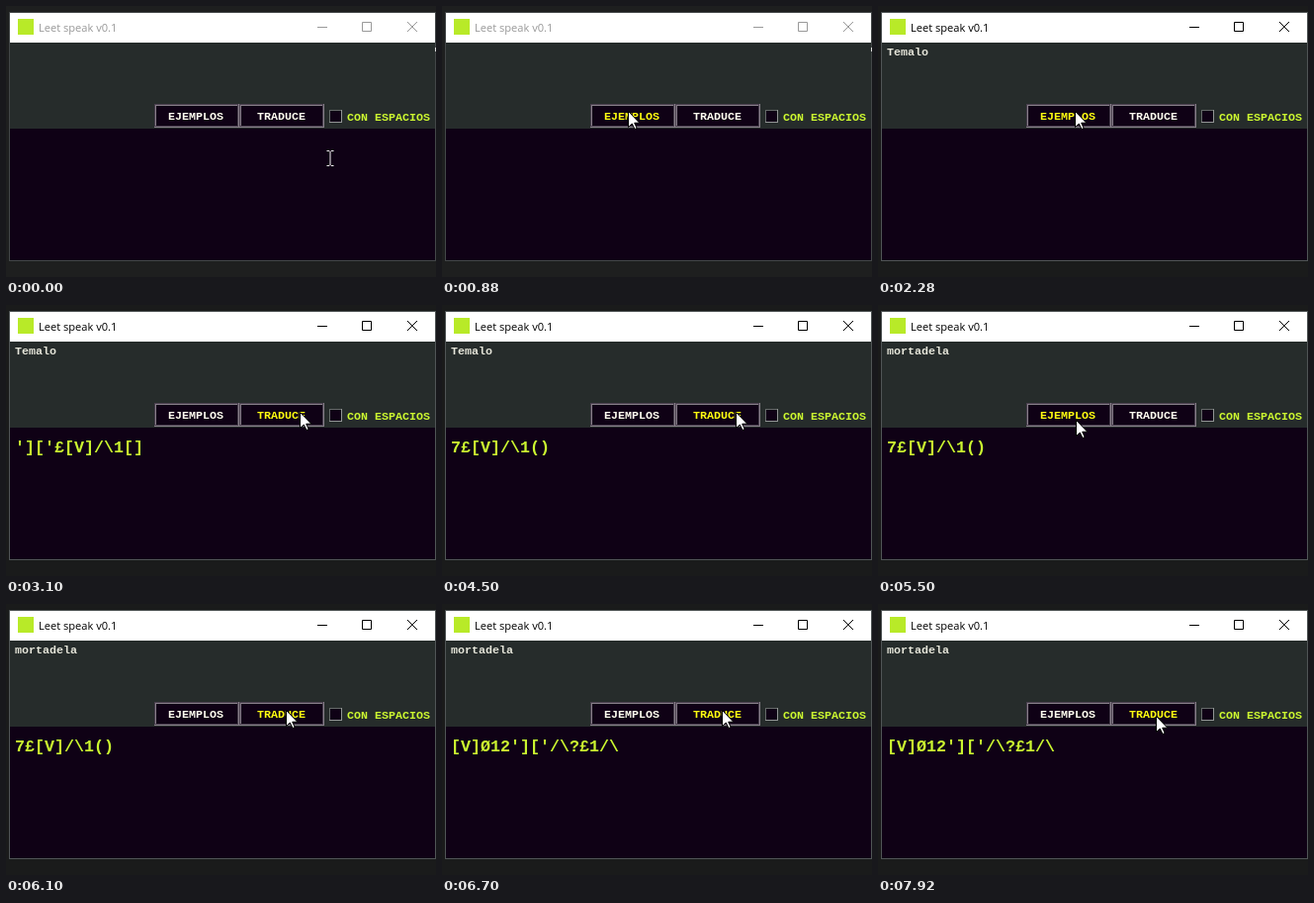
Recreate the animation shown at these times as an HTML page. Size 435 by 274 pixels, loop 8000 ms.

```html
<!DOCTYPE html>
<html lang="es">
<head>
<meta charset="utf-8">
<title>Leet speak</title>
<style>
html, body { margin: 0; width: 100%; height: 100%; overflow: hidden; background: #1e1f1f; }
svg { display: block; width: 435px; height: 274px; }
rect, .crisp { shape-rendering: crispEdges; }
text { font: bold 11.66px "Liberation Mono", "DejaVu Sans Mono", monospace; white-space: pre; }
#title { font: 11.1px "Open Sans", "Noto Sans", sans-serif; }
.lime { fill: #ccf830; }
#output { font-size: 16.667px; }
</style>
</head>
<body>
<svg viewBox="0 0 435 274">
  <rect id="back" width="435" height="274"/>
  <rect x="4" y="7" width="430" height="30" fill="#fff"/>
  <rect x="4" y="37" width="430" height="87" fill="#262c2b"/>
  <rect x="4" y="124" width="430" height="133" fill="#0f0115"/>
  <rect id="border" x="3.5" y="6.5" width="431" height="251" fill="none"/>
  <rect id="speck" x="434" y="42" width="1" height="4" fill="#ddd"/>

  <rect x="12" y="13" width="16" height="16" fill="#b8ea28"/>
  <text id="title" x="33" y="26">Leet speak v0.1</text>
  <path id="controls" d="M315 21.5H325M360.5 16.5H369.5V25.5H360.5ZM406 16L416 26M416 16L406 26" fill="none"/>

  <text id="input" x="9" y="50" fill="#e6e6da"></text>
  <g id="widgets"></g>
  <text class="lime" x="345" y="116">CON ESPACIOS</text>
  <text id="output" class="lime" x="9" y="149"></text>

  <path id="beam" d="M-3.5 -7.5H-1L0 -6.5L1 -7.5H3.5M0 -6.5V6.5M-3.5 7.5H-1L0 6.5L1 7.5H3.5" fill="none" stroke="#f4f4f4"/>
  <path id="arrow" d="M.5 .5V16.5L4.3 13L7 18.5L9.2 17.5L6.7 12.2H11.8Z" fill="#fff" stroke="#000"/>
</svg>
<script>
const LOOP = 8000, STEP = 200, OFFSET = 80;
const LIGHT = "#877f89", DARK = "#4a404f";
const $ = id => document.getElementById(id);
const set = (el, attrs) => { for (const k in attrs) el.setAttribute(k, attrs[k]); };

const words = ["Temalo", "mortadela"];
const leet = {
  a: ["/\\"], d: ["?"], e: ["£"], l: ["1"], m: ["[V]"],
  o: ["[]", "()", "Ø"], r: ["12"], t: ["']['", "7"]
};
const buttons = [
  { label: "EJEMPLOS", x: 150, textX: 164 },
  { label: "TRADUCE", x: 236, textX: 254 }
];

// Pointer glides in steps of 200 ms: first step, last step, end point.
const home = { x: 328, y: 154 };
const glides = [
  [0, 1, 306, 142], [1, 2, 236, 118], [2, 4, 188, 106], [10, 11, 199, 106], [11, 12, 345, 104],
  [12, 14, 297, 108], [23, 25, 200, 116], [28, 30, 283, 107], [38, 39, 281, 113]
];
// Clicks: step of release, steps held down before it.
const clicks = [[6, 0], [15, 0], [22, 0], [27, 1], [33, 1]];

function pointer(n) {
  let { x, y } = home;
  for (const [from, to, endX, endY] of glides) {
    const u = Math.min(1, Math.max(0, (n - from) / (to - from)));
    const k = 1 - (1 - u) ** 2;
    x += (endX - x) * k;
    y += (endY - y) * k;
  }
  return { x, y };
}

function hovered(n) {
  const { x, y } = pointer(n);
  return buttons.findIndex(b => x >= b.x && x < b.x + 86 && y >= 99 && y < 123);
}

const translate = (word, round) =>
  [...word.toLowerCase()].map(c => leet[c][round % leet[c].length]).join("");

function texts(n) {
  let input = "", output = "", examples = 0, rounds = 0;
  for (const [release] of clicks) {
    if (n < release) break;
    if (hovered(release) === 0) input = words[examples++];
    else output = translate(input, rounds++);
  }
  return { input, output };
}

const bevel = (x, y, w, h, topLeft, bottomRight) => `
  <path class="crisp" fill="none" stroke="${topLeft}" d="M${x + .5} ${y + h}V${y + .5}H${x + w}"/>
  <path class="crisp" fill="none" stroke="${bottomRight}" d="M${x} ${y + h - .5}H${x + w - .5}V${y}"/>`;

function button({ label, x, textX }, hover, pressed) {
  const inner = pressed ? [DARK, LIGHT] : [LIGHT, DARK];
  return `<rect x="${x}" y="99" width="86" height="24" fill="#0f0115"/>
    ${bevel(x, 99, 86, 24, DARK, LIGHT)}${bevel(x + 1, 100, 84, 22, ...inner)}
    <text x="${textX}" y="115" fill="${hover ? "#ffff10" : "#fffff0"}">${label}</text>`;
}

const checkbox = `<rect x="327" y="105" width="13" height="13" fill="#0f0115"/>
  ${bevel(327, 105, 13, 13, "#656a69", "#929595")}`;

function draw(t) {
  const n = Math.max(0, Math.floor((t - OFFSET) / STEP));
  const active = n >= clicks[0][0];
  const ink = active ? "#000" : "#999";
  set($("back"), { fill: active ? "#1a1b1b" : "#1e1f1f" });
  set($("border"), { stroke: active ? "#505556" : "#434748" });
  set($("title"), { fill: ink });
  set($("controls"), { stroke: ink });
  set($("speck"), { opacity: active ? 0 : 1 });

  const hover = hovered(n);
  const down = clicks.some(([release, held]) => n < release && n >= release - held);
  $("widgets").innerHTML =
    buttons.map((b, i) => button(b, i === hover, down && i === hover)).join("") + checkbox;

  const { input, output } = texts(n);
  $("input").textContent = input;
  $("output").textContent = output;

  const { x, y } = pointer(n);
  const typing = n < 2;
  const transform = `translate(${Math.round(x)} ${Math.round(y)})`;
  set($("beam"), { transform, opacity: typing ? 1 : 0 });
  set($("arrow"), { transform, opacity: typing ? 0 : 1 });
}

const start = performance.now();
function tick() {
  draw((performance.now() - start) % LOOP);
  requestAnimationFrame(tick);
}
tick();
</script>
</body>
</html>
```
